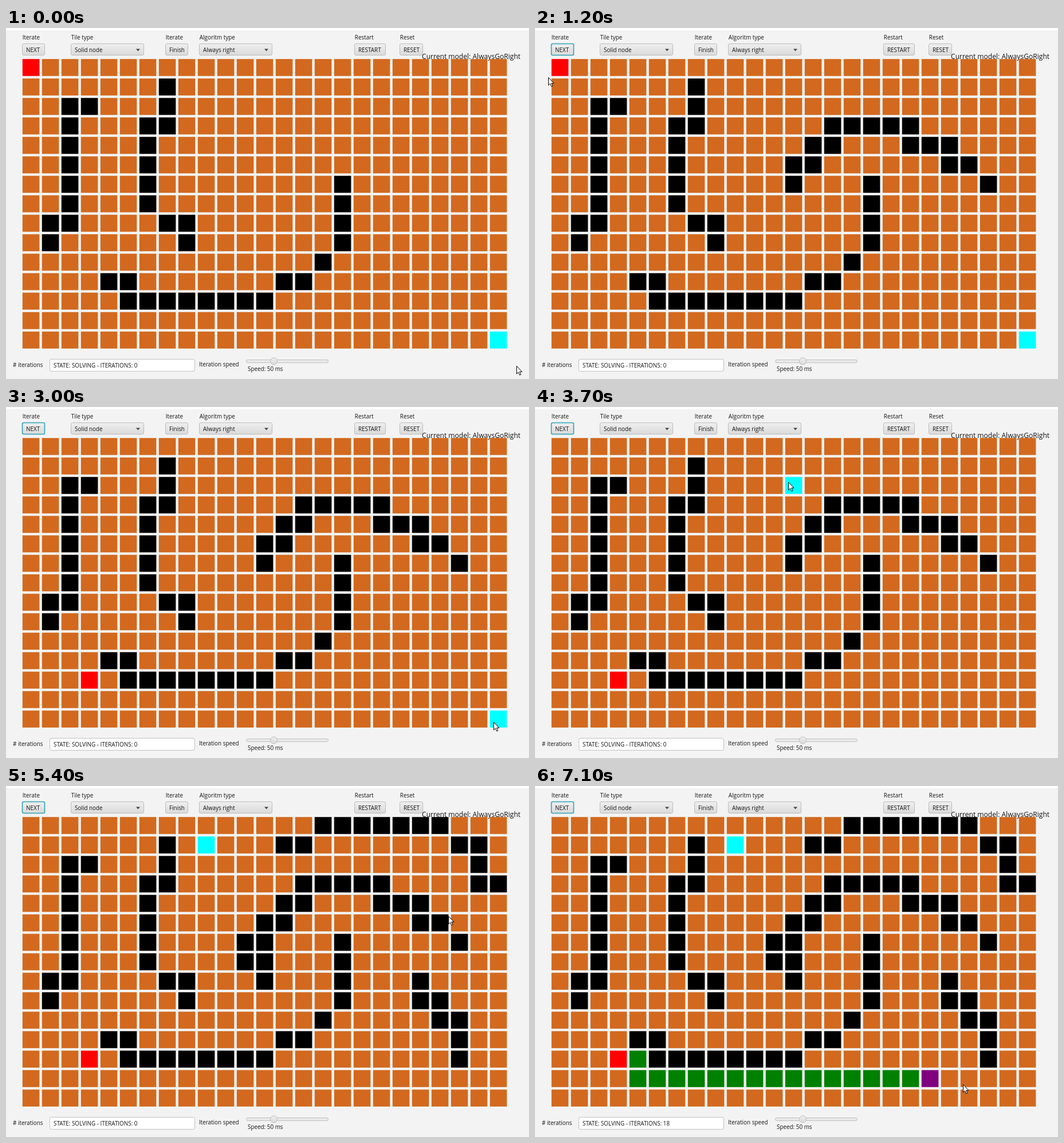
These frames come from a looping animation (913 by 613 pixels, 7.2 s). An HTML page:

```html
<!DOCTYPE html>
<html lang="en">
<head>
<meta charset="utf-8">
<title>Path grid</title>
<style>
  html, body { margin: 0; width: 100%; height: 100%; overflow: hidden; background: #f3f3f3; }
  svg { display: block; position: absolute; left: 0; top: 0; }
  text { font: 9.9px "Open Sans", "Noto Sans", sans-serif; fill: #151515; white-space: pre; }
  .model { font-size: 12.1px; }
  .face { fill: url(#face); stroke: #bcbcbc; }
  .focus { stroke: #2aa5b8; stroke-width: 1.6; }
</style>
</head>
<body>
<svg width="913" height="613" viewBox="0 0 913 613">
  <defs>
    <linearGradient id="face" x1="0" y1="0" x2="0" y2="1">
      <stop offset="0" stop-color="#efefef"/>
      <stop offset="1" stop-color="#dadada"/>
    </linearGradient>
  </defs>
  <rect width="913" height="613" fill="#f3f3f3"/>
  <rect width="913" height="4" fill="#fdfdfd"/>
  <g id="ui"></g>
  <g id="grid"></g>
  <text class="model" x="726" y="54">Current model: AlwaysGoRight</text>
  <text x="12" y="592"># iterations</text>
  <rect x="76.5" y="578.5" width="253" height="21" rx="2.5" fill="#fff" stroke="#c2c2c2"/>
  <text id="status" x="83" y="593"></text>
  <text x="337" y="591">Iteration speed</text>
  <text x="422" y="598.5">Speed: 50 ms</text>
  <rect x="419.5" y="579.5" width="143" height="5" rx="2.5" fill="#e9e9e9" stroke="#c0c0c0"/>
  <circle class="face" cx="467.5" cy="582" r="6"/>
  <path id="cursor" d="M.5 .5V14l3-2.8 2.2 5 2.2-1-2.2-4.8h4.2z" fill="#fff" stroke="#000"/>
</svg>
<script>
const LOOP = 7200, STEP = 100;
const COLS = 25, ROWS = 15, PITCH = 34, SIZE = 29.6, LEFT = 28.8, TOP = 54.2;
const BROWN = '#d2691e', WALL = '#000', START = '#f00', GOAL = '#0ff', TRAIL = '#008000', HEAD = '#800080';
const $ = id => document.getElementById(id);

function add(parent, tag, attrs, text = '') {
  const el = document.createElementNS('http://www.w3.org/2000/svg', tag);
  for (const k in attrs) el.setAttribute(k, attrs[k]);
  el.textContent = text;
  parent.appendChild(el);
  return el;
}

// Captioned button, or combo box when it has an arrow
function control(x, width, caption, text, arrow) {
  const ui = $('ui');
  add(ui, 'text', { x: x + .8, y: 20.3 }, caption);
  const box = add(ui, 'rect', { class: 'face', x: x + .5, y: 27.5, width, height: 20, rx: 2.5 });
  add(ui, 'text', { x: x + 7, y: 41.5 }, text);
  if (arrow) add(ui, 'path', { d: `M${x + width - 13} 36.5h7l-3.5 4z`, fill: '#444' });
  return box;
}
const next = control(28, 39, 'Iterate', 'NEXT');
control(113, 127, 'Tile type', 'Solid node', true);
control(278, 39, 'Iterate', 'Finish');
control(337, 127, 'Algoritm type', 'Always right', true);
control(608, 54, 'Restart', 'RESTART');
control(687, 40, 'Reset', 'RESET');

const cells = Array.from({ length: COLS * ROWS }, (_, i) => add($('grid'), 'rect', {
  x: LEFT + i % COLS * PITCH, y: TOP + Math.floor(i / COLS) * PITCH, width: SIZE, height: SIZE
}));
const index = ([c, r]) => r * COLS + c;
const aim = ([c, r]) => [LEFT + SIZE / 2 + c * PITCH, TOP + SIZE / 2 + 3 + r * PITCH];

// Every cell along a line through "col,row" corners
function line(spec) {
  const [first, ...rest] = spec.split(' ').map(p => p.split(',').map(Number));
  const out = [first];
  let [x, y] = first;
  for (const [c, r] of rest) {
    while (x !== c || y !== r) {
      x += Math.sign(c - x);
      y += Math.sign(r - y);
      out.push([x, y]);
    }
  }
  return out;
}

function gesture(from, to, spec) {
  const path = line(spec);
  return { from, to, path, span: (to - from) / (path.length - 1) };
}

const built = ['3,2 2,2 2,8 1,8 1,9', '7,1 7,3 6,3 6,7 7,8 8,8 8,9', '4,11 5,11 5,12 12,12 13,11 14,11 16,9 16,6']
  .map(spec => gesture(-2, -1, spec));
const painted = [
  gesture(300, 700, '12,6 12,5 13,5 13,4 14,4 14,3 18,3 18,4 20,4 20,5 21,5 22,6'),
  gesture(4000, 4300, '20,8 20,9 21,9 21,10 22,10 22,12'),
  gesture(4550, 4700, '12,8 12,7 11,7 11,6'),
  gesture(4850, 5200, '13,1 14,1 15,0 21,0 22,1 23,1 23,3 24,3')
];
const moveStart = gesture(1450, 1940, '0,0 0,10 2,11 3,12');
const moveGoal = gesture(3250, 3800, '24,14 9,1');
const route = line('3,12 4,12 4,13 24,13');
const RUN = 6100, RATE = 18 / 1000;

// The pointer rests at a few places and follows every gesture in between
const stops = [
  [0, 891, 590], [850, 886, 581], [1200, 23, 86], [3000, 851, 550],
  [4500, 481, 361], [5400, 772, 227], [7100, 747, 521]
];
for (const g of [...painted, moveStart, moveGoal]) {
  g.path.forEach((p, k) => stops.push([g.from + k * g.span, ...aim(p)]));
}
stops.sort((a, b) => a[0] - b[0]);

function pointer(t) {
  const k = Math.max(1, stops.findIndex(s => s[0] >= t));
  const [t0, ...a] = stops[k - 1], [t1, ...b] = stops[k];
  return a.map((v, i) => Math.round(v + (b[i] - v) * (t - t0) / (t1 - t0)));
}

function tileAt(g, t) {
  const k = Math.round((t - g.from) / g.span);
  return index(g.path[Math.max(0, Math.min(g.path.length - 1, k))]);
}

function draw(t) {
  const fill = Array(cells.length).fill(BROWN);
  for (const g of [...built, ...painted]) {
    g.path.forEach((p, k) => { if (t >= g.from + k * g.span) fill[index(p)] = WALL; });
  }
  const n = Math.max(0, Math.floor((t - RUN) * RATE));
  route.slice(0, n).forEach((p, k) => { fill[index(p)] = k === n - 1 ? HEAD : TRAIL; });
  fill[tileAt(moveStart, t)] = START;
  fill[tileAt(moveGoal, t)] = GOAL;

  cells.forEach((el, i) => el.setAttribute('fill', fill[i]));
  next.classList.toggle('focus', t >= painted[0].from);
  $('status').textContent = `STATE: SOLVING - ITERATIONS: ${n}`;
  $('cursor').setAttribute('transform', `translate(${pointer(t)})`);
}

const begin = performance.now();
let last = -1;
function tick() {
  const t = Math.floor((performance.now() - begin) % LOOP / STEP) * STEP;
  if (t !== last) draw(last = t);
  requestAnimationFrame(tick);
}
tick();
</script>
</body>
</html>
```
